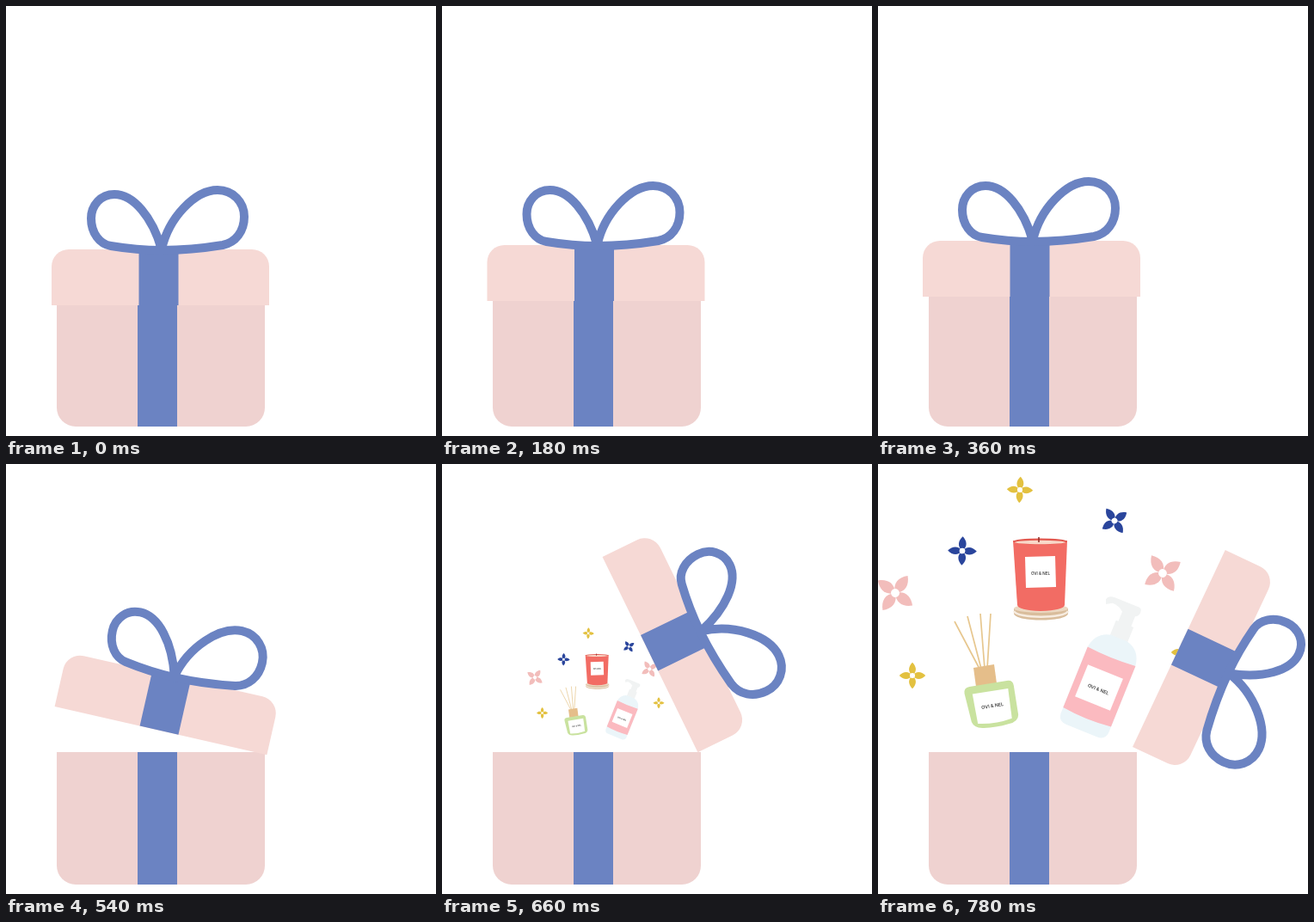
These frames come from a looping animation (500x500 px, 1.8 s). An HTML page:

```html
<!DOCTYPE html>
<html lang="en">
<head>
<meta charset="utf-8">
<title>Gift box</title>
<style>
  html, body { margin: 0; height: 100%; overflow: hidden; background: #fff; }
  svg { display: block; width: 100%; height: 100%; }
  text { font: 600 5.4px Inter, Arial, sans-serif; text-anchor: middle; fill: #444; }
  .ribbon { fill: #6b83c2; }
  .yellow { fill: #e3c140; }
  .blue { fill: #2a459c; }
  .pink { fill: #f2bdbb; }
  .white { fill: #fff; }
</style>
</head>
<body>
<svg viewBox="0 0 500 500">
  <defs>
    <path id="petal" d="M0 0C-6-5-5-11 0-16C5-11 6-5 0 0"/>
    <g id="star">
      <use href="#petal"/>
      <use href="#petal" transform="rotate(90)"/>
      <use href="#petal" transform="rotate(180)"/>
      <use href="#petal" transform="rotate(270)"/>
      <circle r="3.2" class="white"/>
    </g>
  </defs>

  <g id="box">
    <path fill="#efd2d0" d="M59 335H301V467a22 22 0 0 1-22 22H81a22 22 0 0 1-22-22Z"/>
    <path class="ribbon" d="M153 335H199V489H153Z"/>

    <g id="goods">
      <g id="stars"></g>

      <!-- candle -->
      <path fill="#d9bd9c" d="M158 168V174C160 184 219 184 221 174V168Z"/>
      <path fill="none" stroke="#f7ece0" stroke-width="2.5" d="M158 171C162 180 217 180 221 171"/>
      <ellipse cx="189.5" cy="168" rx="31.5" ry="5" fill="#ecd8c2"/>
      <path fill="#f26c64" d="M157 89H220L217 164Q216 170 189 171Q163 170 162 164Z"/>
      <ellipse cx="188.5" cy="90" rx="31.5" ry="3.5" fill="#e2584f"/>
      <ellipse cx="188.5" cy="91" rx="29.5" ry="2.2" fill="#f9d8c9"/>
      <path stroke="#8e2b25" stroke-width="1.5" d="M187 85V91"/>
      <path class="white" d="M171 108L206 107L207 143L172 144Z"/>
      <text x="189" y="128.5" style="font-size:4.6px">OVI &amp; NEL</text>

      <!-- diffuser -->
      <path fill="none" stroke="#e7c78f" stroke-width="1.7"
            d="M89 183L118 238M104 177L120 238M119 174L124 238M131 174L127 238"/>
      <path fill="#e5be8a" d="M111 237L135 233L138 255L114 259Z"/>
      <g transform="translate(133 280) rotate(-9)">
        <path fill="#c9e29f" d="M-30-18Q-30-25-23-25H21Q28-25 28-18V16Q27 24 15 25Q0 27-14 25Q-25 24-27 16Z"/>
        <path class="white" d="M-21-16H21L20 19Q0 23-20 19Z"/>
        <text y="3">OVI &amp; NEL</text>
      </g>

      <!-- pump bottle -->
      <g transform="translate(257 260) rotate(22)">
        <path fill="#f1f3f3" d="M-8-94H8V-80H11V-58H-11V-80H-8Z
          M-31-98Q-30-104-22-104H8Q12-104 12-99Q12-93 6-92H-8Q-14-97-22-97L-29-93Z"/>
        <path fill="#ebf5f9" d="M-30-38Q-28-58-10-62H10Q28-58 30-38V45Q29 54 19 54H-19Q-29 54-30 45Z"/>
        <path fill="#fbbac0" d="M-30-39Q0-36 30-39V37Q0 41-30 37Z"/>
        <path class="white" d="M-22-20H22V20H-22Z"/>
        <text y="4">OVI &amp; NEL</text>
      </g>
    </g>

    <g id="lid">
      <path fill="#f6d9d5" d="M52 338V293a20 20 0 0 1 20-20H285a20 20 0 0 1 20 20V338Z"/>
      <path class="ribbon" d="M153.5 272H199.5V338H153.5Z"/>
      <path fill="none" stroke="#6b83c2" stroke-width="10" stroke-linejoin="round"
            d="M180 273C169 235 147 209 125 209C109 209 98 222 98 237C98 254 108 267 121 269Q151 274 180 274
               Q214 274 251 268C266 265 276 252 276 235C276 218 263 204 245 204C219 204 188 236 180 273"/>
    </g>
  </g>
</svg>
<script>
const STEP = 30, LOOP = 1800;
const $ = id => document.getElementById(id);
const clamp = (v, lo, hi) => Math.min(hi, Math.max(lo, v));

// colour, x, y, rotation, scale
$('stars').innerHTML = [
  ['yellow', 165, 30, 3, 0.95],
  ['yellow', 40, 246, 0, 0.95],
  ['yellow', 356, 219, 0, 0.95],
  ['blue', 98, 101, 2, 1.05],
  ['blue', 275, 66, -34, 1.07],
  ['pink', 20, 150, 36, 1.55],
  ['pink', 331, 127, -32, 1.53],
].map(([c, x, y, r, k]) =>
  `<use href="#star" class="${c}" transform="translate(${x} ${y}) rotate(${r}) scale(${k})"/>`
).join('');

// The box leans left, then drops back
function lean(n) {
  return n <= 10 ? -4 / 3 * Math.max(n - 7, 0) : -2 * Math.max(12 - n, 0);
}

function draw(now) {
  const n = Math.floor(now % LOOP / STEP);
  const drop = 1 - clamp(n / 12, 0, 1);
  const open = 12.8 * clamp(n - 17, 0, 9);
  const pop = clamp((n - 19) / 7, 0, 1);

  $('box').setAttribute('transform', `rotate(${lean(n)} 301 335)`);
  $('lid').setAttribute('transform',
    `translate(${drop} ${10 * drop}) rotate(${open} 303.4 330.6)`);
  $('goods').setAttribute('transform',
    `translate(174 322) scale(${pop}) translate(-174 -322)`);
}

let start;
function tick(now) {
  start ??= now;
  draw(now - start);
  requestAnimationFrame(tick);
}
draw(0);
requestAnimationFrame(tick);
</script>
</body>
</html>
```
